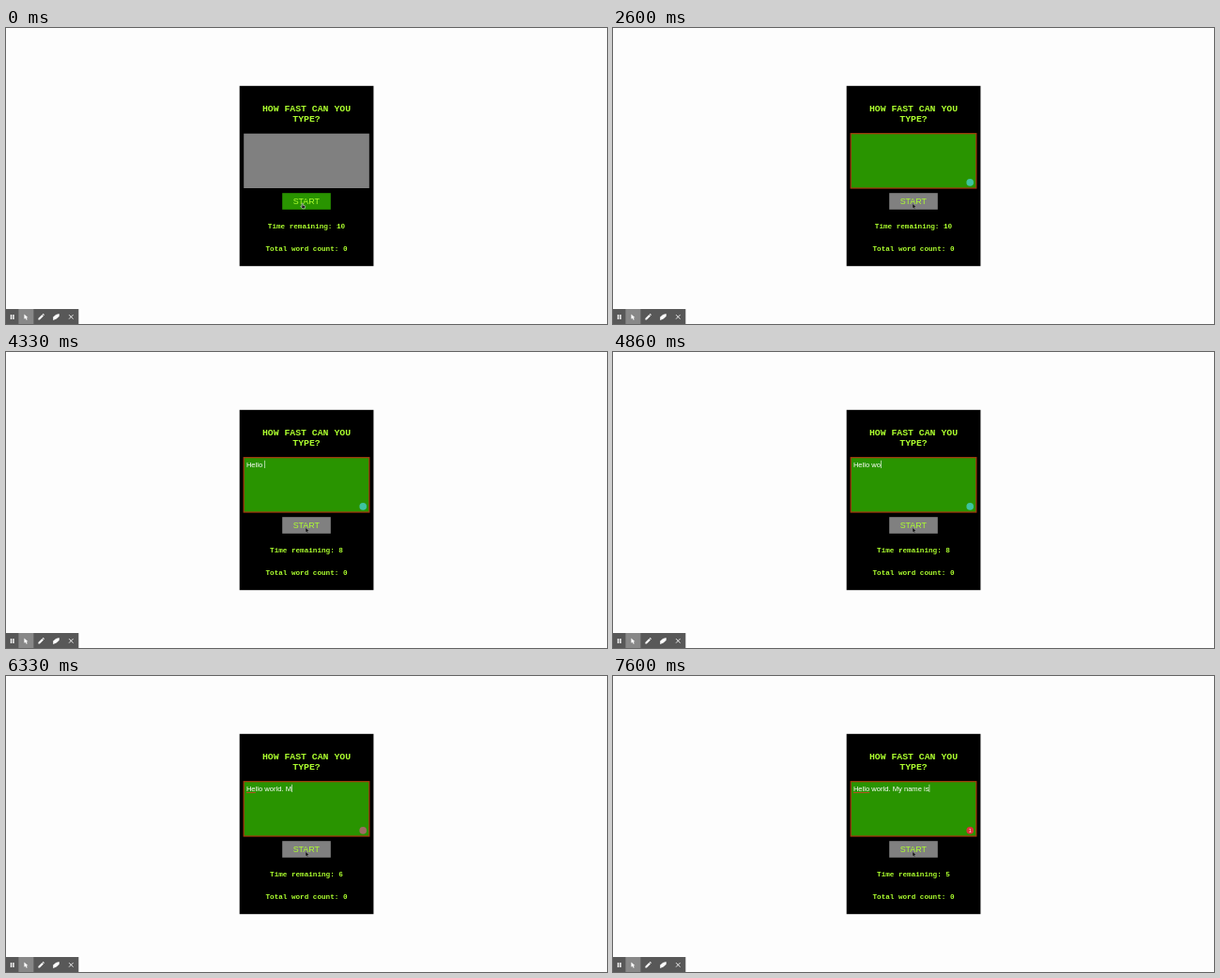
Write an HTML page that moves like this. It is 640 by 316 pixels and loops after 8000 ms.

```html
<!DOCTYPE html>
<html lang="en">
<head>
<meta charset="utf-8">
<title>How fast can you type?</title>
<style>
  html, body { margin: 0; width: 100%; height: 100%; overflow: hidden; background: #fdfdfd; }
  svg { display: block; width: 100%; height: 100%; }
  .mono { font: bold 7.64px "Courier New", "Liberation Mono", monospace; fill: #adff2f; text-anchor: middle; }
  .title { font-size: 9.8px; }
  .sans { font-family: "Liberation Sans", Arial, sans-serif; }
  #typed { font-size: 7.6px; fill: #fff; white-space: pre; }
</style>
</head>
<body>
<svg viewBox="0 0 640 316">
  <rect width="640" height="316" fill="#fdfdfd"/>
  <rect x="248.7" y="61.8" width="142.7" height="192.4"/>
  <text class="mono title" x="320" y="89">HOW FAST CAN YOU</text>
  <text class="mono title" x="320" y="100.2">TYPE?</text>

  <rect id="area" x="253.2" y="112.7" width="133.6" height="58.3"/>
  <text id="typed" class="sans" x="255.9" y="122.7"></text>
  <rect id="underline" x="256" y="124.1" height="0.8" fill="#d8452c"/>
  <rect id="caret" y="115.8" width="0.6" height="8.2" fill="#fff"/>
  <g id="badge">
    <circle id="dot" cx="380.2" cy="164.9" r="3.8"/>
    <text id="errors" class="sans" x="380.2" y="166.8" font-size="5.2" fill="#fff" text-anchor="middle">1</text>
  </g>

  <rect id="button" x="294.2" y="176.2" width="51.6" height="17.6"/>
  <text class="sans" x="319.8" y="188.4" font-size="8.9" fill="#adff2f" text-anchor="middle">START</text>

  <text id="time" class="mono" x="320" y="214"></text>
  <text class="mono" x="320" y="237.7">Total word count: 0</text>

  <circle id="ripple" cx="319.6" cy="188.6" r="10.6" fill="none" stroke="#b3160e" stroke-width="1.1"/>
  <g id="pointer">
    <path id="hand" d="M-.9 -2.6q.7-.7 1.1 0v1.8l2 .5q.6.3.5 1l-.5 2.1h-2.6l-1.8-2.2q0-.8.8-.4l.5.4z" fill="#222" stroke="#e8f5e4" stroke-width=".55"/>
    <path id="arrow" d="M-.7 -1.9v4l.9-.8.7 1.4.6-.3-.6-1.3h1.3z" fill="#111"/>
  </g>

  <g id="toolbar">
    <rect y="300" width="77.3" height="16" fill="#585858"/>
    <rect x="13.4" y="300" width="16" height="16" fill="#888"/>
    <path d="M4.8 306h1.4v5h-1.4zM7.2 306h1.4v5h-1.4z" fill="#fff"/>
    <path d="M19.4 305.4v5.4l1.3-1.1 1 2 1-.5-1-1.9h1.7z" fill="#fff"/>
    <path d="M34.4 311.4v-1.5l4-4 1.5 1.5-4 4zM38.8 305.5l.5-.4q.3-.2.6 0l.8.8q.3.3 0 .6l-.4.5z" fill="#fff"/>
    <path d="M50.2 308.4l3-2.3 3.5-1v2.6l-3 2.7-3.5 1.5z" fill="#fff"/>
    <path d="M67.1 306.2l4.4 4.4M71.5 306.2l-4.4 4.4" stroke="#fff" stroke-width=".9"/>
  </g>
</svg>
<script>
const LOOP = 8000, PRESS = 1930, START = 2060, BLINK = 530;
const GREEN = "#299400", GRAY = "#808080", EDGE = "#a93a0e";
const PHRASE = "Hello world. My name is";
const KEYS = [3800, 3930, 4060, 4130, 4200, 4270, 4660, 4860, 5060, 5260, 5460,
  5730, 5930, 6260, 6400, 6530, 6660, 6800, 6930, 7060, 7200, 7330, 7460];

const el = id => document.getElementById(id);
const set = (id, attrs) => {
  for (const k in attrs) el(id).setAttribute(k, attrs[k]);
};
const show = (id, on) => set(id, { visibility: on ? "visible" : "hidden" });
const ramp = (t, a, b) => Math.min(1, Math.max(0, (t - a) / (b - a)));
const blend = (a, b, p) => `rgb(${a.map((v, i) => Math.round(v + (b[i] - v) * p))})`;

function draw(t) {
  const started = t >= START, pressed = t >= PRESS && !started;

  set("area", { fill: started ? GREEN : GRAY, stroke: started ? EDGE : "none", "stroke-width": 1.2 });
  set("button", { fill: started ? GRAY : GREEN, stroke: pressed ? "#981d08" : "none", "stroke-width": 1.6 });

  // Countdown
  const left = 10 - (started ? Math.floor((t - START) / 1000) : 0);
  el("time").textContent = "Time remaining: " + left;

  // Typing; the caret restarts its blink at each key
  const count = KEYS.filter(k => t >= k).length;
  const since = t - (count ? KEYS[count - 1] : START);
  el("typed").textContent = PHRASE.slice(0, count);
  const width = count ? el("typed").getComputedTextLength() : 0;
  set("caret", { x: 256 + width });
  show("caret", started && Math.floor(since / BLINK) % 2 === 0);

  // Spelling mark and badge
  set("underline", { width: 17.2 * ramp(t, 6200, 6430) });
  show("badge", t >= 2200);
  set("dot", { fill: blend([62, 196, 160], [224, 49, 58], ramp(t, 6230, 6400)) });
  set("errors", { opacity: ramp(t, 6370, 6500) });

  // Pointer and click ring
  const move = ramp(t, 0, 400), ease = move * move * (3 - 2 * move);
  set("pointer", { transform: `translate(${316 + 4 * ease} 190)` });
  show("hand", !started);
  show("arrow", started);
  set("ripple", { opacity: t < PRESS ? 0 : 1 - ramp(t, START, 2400) });
}

const begin = performance.now();
function tick() {
  draw((performance.now() - begin) % LOOP);
  requestAnimationFrame(tick);
}
tick();
</script>
</body>
</html>
```
